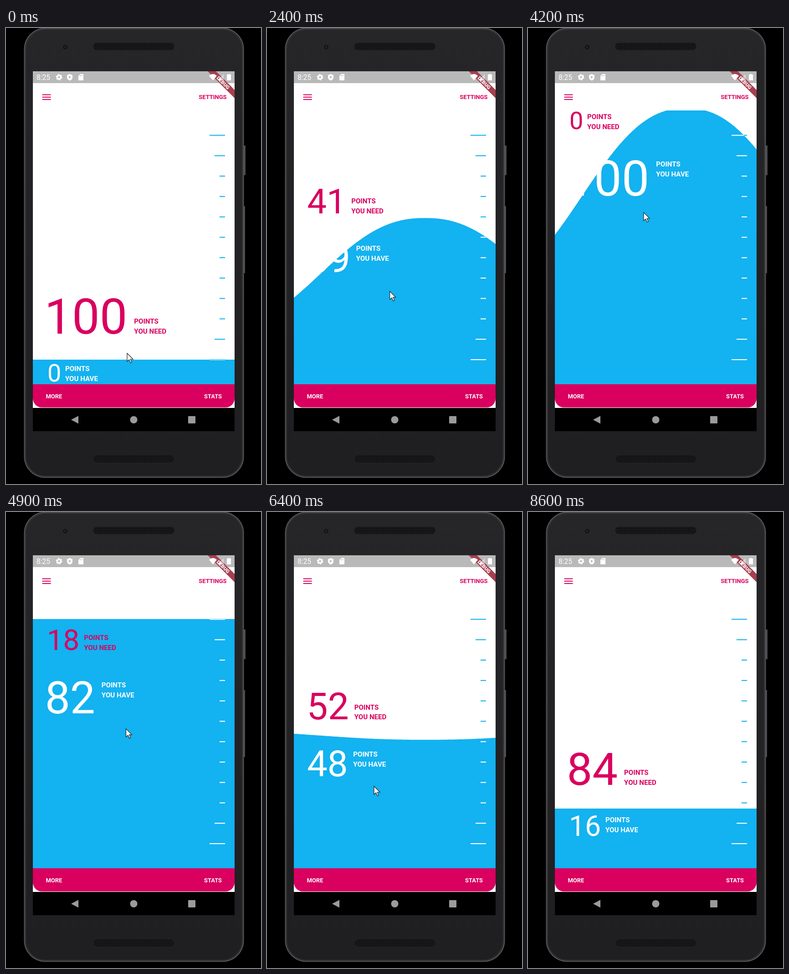
Write an HTML page that moves like this. It is 560 px wide and 1001 px high and loops after 8700 ms.

```html
<!DOCTYPE html>
<html lang="en">
<head>
<meta charset="utf-8">
<title>Springy points slider</title>
<style>
  html, body { margin: 0; width: 100%; height: 100%; overflow: hidden; background: #000; }
  svg { display: block; width: 100vw; height: 100vh; font-family: Roboto, sans-serif; }
  .pink { fill: #d9005f; }
  .blue { fill: #13b2f0; }
  .white { fill: #fff; }
  .button { font-size: 12.94px; font-weight: 700; }
  .label { font-size: 15.1px; font-weight: 700; }
</style>
</head>
<body>
<svg viewBox="0 0 560 1001">
  <defs>
    <clipPath id="waveClip"><path id="waveEdge"/></clipPath>
    <clipPath id="screen"><rect x="59" y="95" width="443" height="790"/></clipPath>
    <linearGradient id="body" x2="0" y2="1">
      <stop stop-color="#262628"/><stop offset="1" stop-color="#1f1e20"/>
    </linearGradient>
    <pattern id="mesh" width="4" height="4" patternUnits="userSpaceOnUse">
      <rect width="4" height="4" fill="#111113"/><circle cx="2" cy="2" r="1" fill="#2a2a2c"/>
    </pattern>
    <g id="ticks"></g>
  </defs>

  <rect x="521" y="258" width="5" height="65" fill="#4c4c4e"/>
  <rect x="521" y="391" width="4" height="147" fill="#4c4c4e"/>
  <rect x="40.5" y="0.5" width="481" height="986" rx="46" fill="url(#body)" stroke="#59595b" stroke-width="2"/>
  <rect x="43" y="3" width="476" height="981" rx="44" fill="none" stroke="#333335" stroke-width="2"/>
  <circle cx="130" cy="42" r="5" fill="#141417"/><circle cx="130" cy="42" r="2" fill="#29292e"/>
  <rect x="192" y="33" width="177" height="15" rx="7" fill="url(#mesh)" stroke="#151517"/>
  <rect x="193" y="939" width="176" height="14" rx="7" fill="url(#mesh)" stroke="#151517"/>

  <g clip-path="url(#screen)">
    <rect class="white" x="59" y="95" width="443" height="739"/>
    <rect x="59" y="95" width="443" height="26" fill="#b9b9b9"/>
    <path d="M443 95H461L502 136V154Z" fill="#a63f50"/>
    <text class="white" transform="translate(477 120) rotate(45)" y="4" text-anchor="middle" font-size="11" font-weight="900">DEBUG</text>
    <rect x="59" y="834" width="443" height="52"/>
    <use href="#ticks" class="blue"/>
    <path id="wave" class="blue"/>
    <g clip-path="url(#waveClip)"><use href="#ticks" class="white"/></g>
    <path class="pink" d="M59 782H502V813a20 20 0 0 1-20 20H79a20 20 0 0 1-20-20Z"/>
  </g>

  <text class="white" x="67" y="114" font-size="15.6">8:25</text>
  <g class="white">
    <circle cx="116.500" cy="108" r="4" fill="none" stroke="#fff" stroke-width="3.4"/>
    <circle cx="116.500" cy="108" r="6" fill="none" stroke="#fff" stroke-width="2" stroke-dasharray="3 3.28"/>
    <path d="M140 101l6 2.500v5q0 4.500-6 7q-6-2.500-6-7v-5Z"/>
    <path d="M138 105l5 3-5 3Z" fill="#b9b9b9"/>
    <path d="M163 101h7v14h-11v-10Z"/>
    <path d="M162 103v3m2.500-3v3m2.500-3v3" stroke="#b9b9b9"/>
    <path d="M446 105q8.500-8 17 0l-8.500 10Z"/>
    <path d="M478 101v14h-13Z" fill-opacity=".45"/>
    <path d="M472 107.500v7.500h-7Z"/>
    <path d="M485 102h2.500v-1h4v1h2.500v13h-9Z"/>
  </g>
  <path d="M79.500 146.500h19m-19 5.200h19m-19 5.200h19" stroke="#d9005f" stroke-width="2"/>
  <text class="button pink" x="484.500" y="155.700" text-anchor="end">SETTINGS</text>
  <text class="button white" x="87.500" y="812.600">MORE</text>
  <text class="button white" x="474" y="812.600" text-anchor="end">STATS</text>
  <g fill="#9b9b9b">
    <path d="M143 860l16-8.500v17Z"/><circle cx="280.500" cy="860" r="8"/>
    <rect x="400" y="852" width="16" height="16" rx="1"/>
  </g>

  <g id="need" class="pink"><text class="count"></text><text class="label">POINTS</text><text class="label">YOU NEED</text></g>
  <g id="have" class="white"><text class="count"></text><text class="label">POINTS</text><text class="label">YOU HAVE</text></g>
  <path id="cursor" d="M0 0V18L4.300 14.200L7.400 21L10.200 19.800L7.200 13H13Z" fill="#fff" stroke="#222" stroke-width="1.200"/>
</svg>
<script>
const $ = id => document.getElementById(id);
const LOOP = 8700, STEP = 100;
const ZERO_Y = 728, RANGE = 493, TOP = 181, BOTTOM = 782;
const LEFT = 59, RIGHT = 502, CREST_X = 347;

// Each track alternates time and value.
const tracks = {
  value: [100, 0, 900, .388, 1100, .388, 1500, .45, 1800, .39, 2000, .39, 2700, .716, 3650, .716,
          4100, 1, 4600, 1, 5100, .72, 5600, .72, 6100, .48, 6500, .48, 7100, .16],
  base: [1000, 728, 1500, 470, 1800, 536, 2600, 536, 3000, 373, 4000, 373, 4200, 365, 4600, 235,
         4900, 235, 5300, 372, 6000, 372, 6300, 491, 6900, 491, 7250, 675, 7500, 642, 7800, 651],
  crest: [100, 728, 900, 536, 2000, 536, 2700, 340, 3100, 470, 3500, 373, 3700, 373, 4200, 176,
          4600, 235, 4900, 235, 5500, 437, 6050, 500, 6400, 500, 7000, 670, 7600, 651],
  cursorX: [100, 266, 900, 248, 1800, 248, 3100, 297, 4200, 254, 5500, 271, 6400, 235],
  cursorY: [100, 714, 900, 521, 1600, 521, 2000, 677, 2700, 514, 3100, 568, 3500, 715, 4200, 405,
            4600, 405, 5300, 585, 5500, 585, 6000, 657, 6400, 602, 7200, 706, 7600, 748]
};

function sample(track, t) {
  let i = 0;
  while (i < track.length && track[i] <= t) i += 2;
  if (!i) return track[1];
  if (i >= track.length) return track[track.length - 1];
  const [t0, v0, t1, v1] = track.slice(i - 2, i + 2);
  const u = (t - t0) / (t1 - t0);
  return v0 + (v1 - v0) * u * u * (3 - 2 * u);
}

function drawWave(base, crest) {
  let d = `M${LEFT} ${BOTTOM}`;
  for (let x = LEFT; x <= RIGHT + 2; x += 3) {
    const angle = 1.05 * (Math.abs(x - CREST_X) / 155) ** 1.15;
    const y = base + (crest - base) * (.045 + .955 * Math.cos(angle));
    d += `L${x} ${Math.max(TOP, Math.min(BOTTOM, y)).toFixed(1)}`;
  }
  d += `V${BOTTOM}Z`;
  $('wave').setAttribute('d', d);
  $('waveEdge').setAttribute('d', d);
}

function place(text, x, y) {
  text.setAttribute('x', x);
  text.setAttribute('y', y);
}

function drawPoints(id, share, count, baseline, labelY) {
  const [number, first, second] = $(id).children;
  const size = 53.9 * (1 + share);
  number.textContent = count;
  number.setAttribute('font-size', size);
  place(number, 91 - 6.5 * share, baseline);
  const labelX = 99.7 + .5615 * size * String(count).length;
  place(first, labelX, labelY);
  place(second, labelX, labelY + 21.7);
}

function draw(time) {
  const t = Math.floor(time % LOOP / STEP) * STEP;
  const at = name => sample(tracks[name], t);
  const have = at('value'), need = 1 - have;
  const level = ZERO_Y - RANGE * have;
  const count = Math.round(have * 100);
  const needY = level - 13.5 - 43.5 * need;
  drawWave(at('base'), at('crest'));
  drawPoints('need', need, 100 - count, needY, needY - 21.7);
  drawPoints('have', have, count, level + 48 + 85 * have, level + 25 + 44 * have);
  $('cursor').setAttribute('transform', `translate(${at('cursorX')} ${at('cursorY')})`);
  $('cursor').style.display = t < 8400 ? '' : 'none';
}

for (let i = 0; i < 12; i++) {
  const width = [34, 23][Math.min(i, 11 - i)] || 12;
  $('ticks').innerHTML += `<rect x="${481 - width}" y="${234.5 + i * 44.77}" width="${width}" height="2.1"/>`;
}

const start = performance.now();
function tick() {
  draw(performance.now() - start);
  requestAnimationFrame(tick);
}
tick();
</script>
</body>
</html>
```
